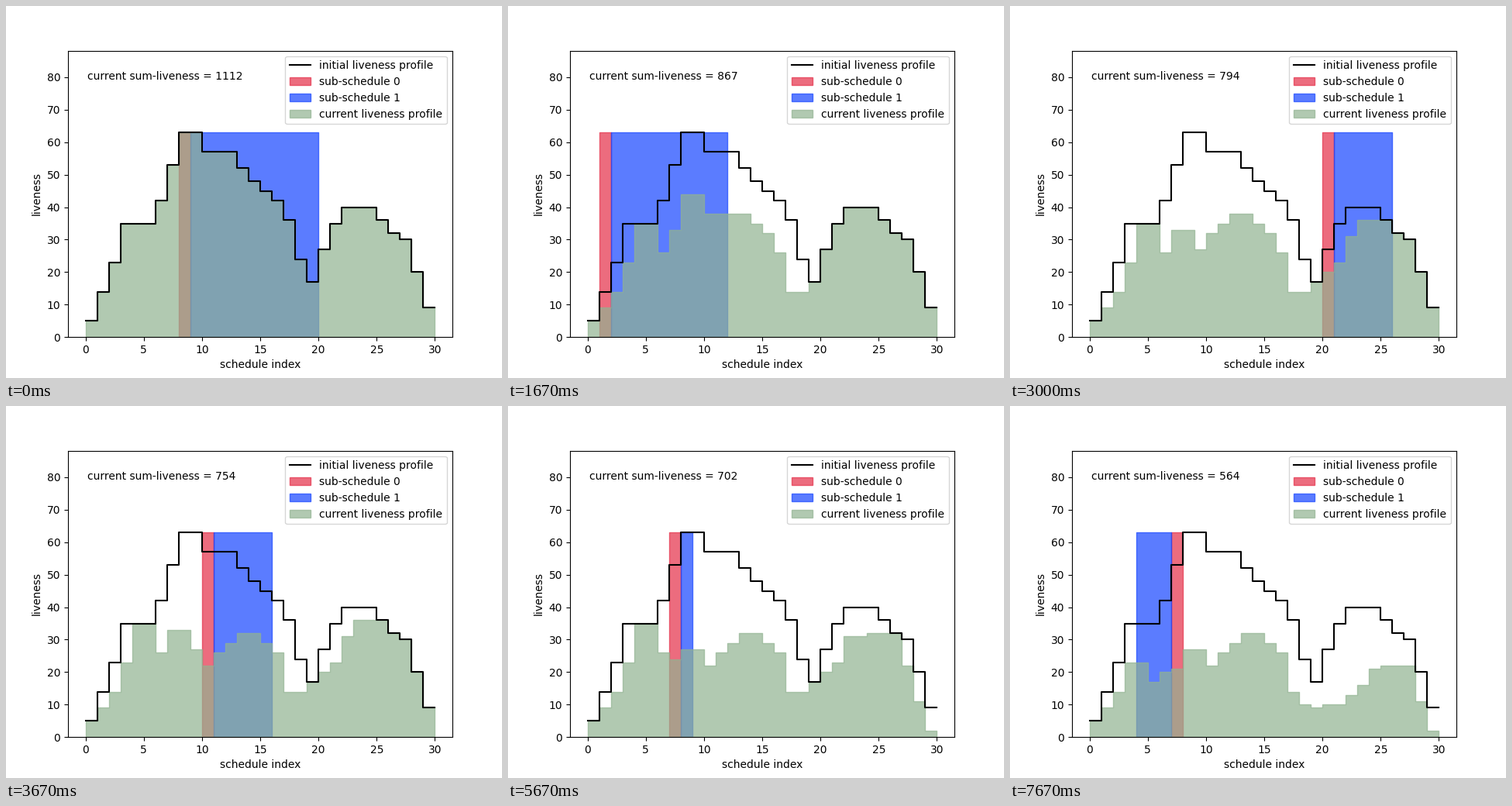
A matplotlib script for the animation above (8 s loop, 640 by 480 pixels).

```python
import matplotlib.pyplot as plt
from matplotlib.animation import FuncAnimation

RED, BLUE, GREEN = "#e42e48", "#1644ff", "#91b391"
LOOP_MS = 8000

INITIAL = [5, 14, 23, 35, 35, 35, 42, 53, 63, 63, 57, 57, 57, 52, 48,
           45, 42, 36, 24, 17, 27, 35, 40, 40, 40, 36, 32, 30, 20, 9]

# Each move: from index, to index, liveness of the moved item at its new
# place, and the liveness change of every item it passes.
MOVES = [
    (8, 19, 17, [-10] * 10 + [-3]),
    (11, 12, 38, [-2]),
    (11, 1, 9, [0] * 4 + [-9] * 6),
    (8, 12, 38, [-11, -11, -6, -3]),
    (25, 20, 20, [-4] * 5),
    (15, 10, 22, [-6] * 5),
    (24, 29, 2, [0] * 2 + [2] * 3),
    (23, 24, 32, [-5]),
    (8, 7, 24, [-6]),
    (23, 18, 9, [-4] * 5),
    (26, 18, 10, [0, 0, -3, -3, -3, -6, -10, -10]),
    (4, 7, 21, [-12, -9, -4]),
]


def apply_move(profile, move):
    src, dst, own, changes = move
    lo, hi = min(src, dst), max(src, dst) + 1
    passed = [v for i, v in enumerate(profile[lo:hi], lo) if i != src]
    passed = [v + c for v, c in zip(passed, changes)]
    passed.insert(dst - lo, own)
    return profile[:lo] + passed + profile[hi:]


profiles = [INITIAL]
for move in MOVES:
    profiles.append(apply_move(profiles[-1], move))

edges = range(len(INITIAL) + 1)
peak = max(INITIAL)
fig, ax = plt.subplots(figsize=(6.4, 4.8), dpi=100)


def closed(profile):
    return profile + profile[-1:]


def bar(start, stop, color, label):
    ax.fill_between([start, stop], [peak, peak], color=color, alpha=0.7,
                    label=label)


def draw(frame):
    # Even frames show the parts before the move, odd frames after it.
    step, moved = divmod(frame, 2)
    src, dst = MOVES[step][:2]
    lo, hi = min(src, dst), max(src, dst) + 1
    single = dst if moved else src
    block = (lo + 1, hi) if single == lo else (lo, hi - 1)
    profile = profiles[step + moved]

    ax.clear()
    ax.plot(edges, closed(INITIAL), color="black", drawstyle="steps-post",
            label="initial liveness profile")
    bar(single, single + 1, RED, "sub-schedule 0")
    bar(*block, BLUE, "sub-schedule 1")
    ax.fill_between(edges, closed(profile), step="post", color=GREEN,
                    alpha=0.7, label="current liveness profile")
    ax.text(0.05, 0.9, f"current sum-liveness = {sum(profile)}",
            transform=ax.transAxes)
    ax.set_xlim(-1.5, 31.5)
    ax.set_ylim(0, 1.4 * peak)
    ax.set_xlabel("schedule index")
    ax.set_ylabel("liveness")
    ax.legend(loc="upper right")
    return []


frame_count = 2 * len(MOVES)
anim = FuncAnimation(fig, draw, frames=frame_count, init_func=lambda: [],
                     interval=LOOP_MS / frame_count, repeat=True,
                     repeat_delay=0)
plt.show()
```
